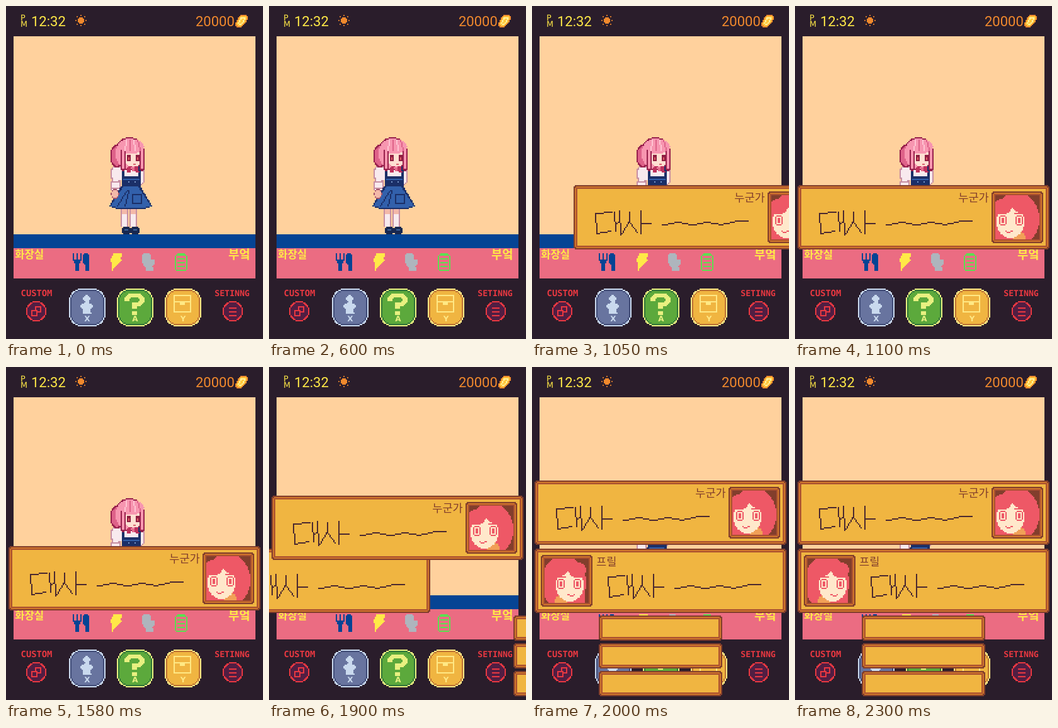
Animation of 408 by 528 pixels, one loop 2.5 s. Source, as an HTML page with a canvas:

```html
<!DOCTYPE html>
<html lang="ko">
<head>
<meta charset="utf-8">
<title>Pocket room</title>
<style>
html, body { margin: 0; width: 100%; height: 100%; overflow: hidden; background: #2a1d2b; }
canvas { display: block; }
</style>
</head>
<body>
<canvas id="stage" width="408" height="528"></canvas>
<script>
const ctx = document.getElementById('stage').getContext('2d');
const LOOP = 2500, STEP = 50, SLIDE_STEPS = 3;
const INK = '#2a1d2b', GOLD = '#f0b541', BROWN = '#823e2c', ORANGE = '#cf752b', RUST = '#ab5130';
const RED = '#e93841', YELLOW = '#ffe947', PINK = '#eb6c82', BLUE = '#054494', PLUM = '#511e43';
const KOREAN = '"Noto Sans CJK KR", "Noto Sans CJK", sans-serif';
const MONO = '"DejaVu Sans Mono", monospace';

// All drawing uses 2px art pixels.
function rect(color, x, y, w, h) {
  ctx.fillStyle = color;
  ctx.fillRect(x, y, w, h);
}

function row(color, cx, y, width) {
  const from = Math.round(cx - width / 2);
  rect(color, from, y, Math.round(cx + width / 2) - from, 1);
}

// Ellipse; lean shifts each row sideways.
function disc(color, cx, cy, rx, ry = rx, lean = 0) {
  for (let y = Math.floor(cy - ry); y < cy + ry; y++) {
    const dy = y + 0.5 - cy, d = 1 - (dy / ry) ** 2;
    if (d > 0) row(color, cx + lean * dy, y, 2 * rx * Math.sqrt(d));
  }
}

// Column whose width goes from top to bottom while its centre drifts.
function taper(color, cx, y, h, top, bottom, drift = 0) {
  for (let i = 0; i < h; i++) {
    const k = i / (h - 1);
    row(color, cx + drift * k, y + i, top + (bottom - top) * k);
  }
}

function round(color, x, y, w, h, r) {
  for (let i = 0; i < h; i++) {
    const k = Math.max(0, r - Math.min(i, h - 1 - i) - 0.5);
    const inset = Math.round(r - Math.sqrt(r * r - k * k));
    rect(color, x + inset, y + i, w - 2 * inset, 1);
  }
}

function line(color, ...p) {
  for (let i = 0; i + 3 < p.length; i += 2) {
    const dx = p[i + 2] - p[i], dy = p[i + 3] - p[i + 1];
    const n = Math.max(Math.abs(dx), Math.abs(dy));
    for (let k = 0; k <= n; k++)
      rect(color, Math.round(p[i] + dx * k / n), Math.round(p[i + 1] + dy * k / n), 1, 1);
  }
}

function text(str, x, y, size, color, family, weight = 400, align = 'left') {
  ctx.font = `${weight} ${size}px ${family}`;
  ctx.textAlign = align;
  ctx.fillStyle = color;
  ctx.fillText(str, x, y);
}

function at(x, y, draw) {
  ctx.save();
  ctx.translate(x, y);
  draw();
  ctx.restore();
}

function drawHeader() {
  ['P', 'M'].forEach((c, i) => text(c, 11.5, 11.5 + 4.8 * i, 6.4, YELLOW, '"DejaVu Sans", sans-serif'));
  text('12:32', 20, 15.8, 11, YELLOW, 'Roboto, sans-serif');
  text('20000', 150.5, 15.8, 11, '#f1892d', 'Roboto, sans-serif');
  disc('#f1892d', 59.5, 11.5, 2.6);
  for (let i = 0; i < 8; i++) {
    const a = i * Math.PI / 4;
    rect(ORANGE, Math.round(59 + 4.4 * Math.cos(a)), Math.round(11 + 4.4 * Math.sin(a)), 1, 1);
  }
  ['#f1892d', '#ffc83a', '#fff0a0', '#ffc83a'].forEach((c, i) =>
    disc(c, 187, 11.8, 4.2 - i, 5.3 - i, -0.45));
}

function drawGirl() {
  const hairDark = '#98204c', hairMid = '#de6289', hair = '#f796b0', shine = '#ffc4d2';
  const skin = '#ffdfd2', white = '#f8eaee', shade = '#c78fa2', navy = '#1b2f68', blue = '#3260ab';
  for (const x of [91, 98]) {
    rect(shade, x, 161, 6, 14);
    rect('#f3b9a9', x + 1, 161, 4, 4);
    rect(white, x + 1, 165, 4, 10);
    round('#182850', x + 1, 175, 7, 6, 2);
    rect('#3e659f', x + 3, 177, 3, 1);
  }

  [[shade, 0], [white, 1]].forEach(([color, inset]) => {
    disc(color, 88, 133, 5.5 - inset, 6.5 - inset);
    disc(color, 107, 135, 3.5 - inset, 7 - inset);
    round(color, 83 + inset, 138, 8 - 2 * inset, 9, 2);
    taper(color, 99, 128, 10, 18 - 2 * inset, 16);
  });
  rect(shade, 84, 139, 6, 1);
  rect(shade, 84, 144, 6, 1);

  rect(navy, 92, 135, 15, 9);
  for (const x of [92, 105]) rect(navy, x, 127, 2, 8);
  rect(blue, 93, 137, 13, 1);
  for (const x of [97, 102]) rect('#7998c9', x, 139, 1, 1);
  taper(navy, 99, 142, 17, 15, 34);
  disc(navy, 99, 158, 16.5, 3.5);
  taper(blue, 99, 143, 16, 12, 32);
  disc(blue, 99, 158, 15, 2.5);
  for (const fold of [-5, -2]) line(navy, 98 + fold / 2, 146, 98 + 2 * fold, 158);
  rect(navy, 100, 149, 8, 8);
  rect(blue, 101, 150, 6, 6);
  disc('#a5546a', 86.5, 149, 3.2, 4.2);
  disc('#f3b9a9', 86.5, 149, 2.4, 3.4);

  disc(hairDark, 88, 119, 5.5, 9);
  disc(hairDark, 98, 117, 12, 13);
  disc(hairMid, 88, 119, 4.3, 7.8);
  disc(hair, 98, 117, 11, 12);
  disc(skin, 101, 121, 7, 6.5);
  disc(hair, 100, 111.5, 9.5, 5.5);
  for (const x of [92, 107]) {
    round(hairDark, x - 1, 113, 4, 18, 2);
    rect(hair, x, 113, 2, 16);
  }
  for (let i = 0; i < 4; i++) {
    line(i % 2 ? hairMid : shine, 95 + 3 * i, 106, 94 + 4 * i, 114);
  }
  for (const x of [96, 103]) {
    rect('#8f1f42', x, 118, 3, 5);
    rect('#e15c64', x + 1, 120, 1, 2);
  }
  rect('#d9636f', 101, 125, 2, 1);
  taper('#bd315d', 98, 127, 5, 3, 3, -1);
  taper('#bd315d', 103, 127, 5, 3, 3, 1);
  rect('#e56b8c', 100, 128, 2, 3);
}

function drawStatus() {
  const grey = '#aeb5bd', green = '#5ae150';
  for (const x of [53, 56, 59]) rect(BLUE, x, 196, 1, 6);
  taper(BLUE, 56.5, 201, 4, 7, 3);
  rect(BLUE, 55, 204, 3, 6);
  round(BLUE, 61, 196, 5, 9, 2);
  rect(BLUE, 63, 197, 3, 13);
  taper(YELLOW, 88.5, 196, 7, 7, 8, -2);
  taper(YELLOW, 88, 201, 9, 8, 1, -4);
  round(grey, 108, 196, 7, 9, 2);
  disc(grey, 113, 204, 4.5, 3.5);
  rect(grey, 115, 201, 3, 4);
  rect(grey, 111, 207, 6, 3);
  round(green, 134, 197, 10, 13, 2);
  rect(green, 136, 196, 6, 2);
  rect(PINK, 135, 198, 8, 11);
  for (let i = 0; i < 3; i++) rect(green, 136, 200 + 3 * i, 6, 1);
  text('화장실', 7, 200.2, 8.4, YELLOW, KOREAN, 700);
  text('부엌', 176.5, 200.6, 9.4, YELLOW, KOREAN, 700);
}

function drawButton(x, letter, fill, light, dark) {
  [light, dark, fill].forEach((c, i) => round(c, x + i, 224 + i, 29 - 2 * i, 30 - 2 * i, 10 - i));
  text(letter, x + 14.5, 250, 6, light, '"DejaVu Sans", sans-serif', 700, 'center');
}

function drawControls() {
  const pale = '#c9d9ee', lime = '#e8f080', cream = '#ffe884', green = '#5ca93c';
  drawButton(50, 'X', '#68749f', pale, '#404b77');
  disc(pale, 64, 232, 2.8);
  disc(pale, 64, 238, 5, 2.2);
  taper(pale, 64, 234, 10, 3, 7);

  drawButton(88, 'A', green, lime, '#2f7538');
  disc(lime, 102, 233, 8, 5.5);
  disc(green, 102, 233, 4, 2.5);
  rect(green, 93, 234, 7, 5);
  rect(lime, 100, 236, 4, 4);
  rect(lime, 100, 242, 4, 3);

  drawButton(126, 'Y', GOLD, cream, '#bd7131');
  round(cream, 133, 229, 14, 14, 1);
  rect(GOLD, 134, 230, 12, 12);
  rect(cream, 134, 234, 12, 1);
  rect(cream, 138, 235, 4, 2);

  text('CUSTOM', 11.8, 230, 6.9, RED, MONO, 700);
  text('SETINNG', 165.6, 230, 6.6, RED, MONO, 700);
  for (const x of [24, 180]) {
    disc(RED, x, 242, 8);
    disc(PLUM, x, 242, 7);
  }
  for (const shift of [0, 3]) {
    rect(RED, 23 - shift, 238 + shift, 5, 5);
    rect(PLUM, 24 - shift, 239 + shift, 3, 3);
  }
  for (let i = 0; i < 3; i++) rect(RED, 177, 239 + 3 * i, 6, 1);
}

function drawFrame(w, h) {
  [BROWN, ORANGE, RUST, GOLD].forEach((c, i) => round(c, i, i, w - 2 * i, h - 2 * i, Math.max(1, 3 - i)));
}

function drawPortrait(mirrored) {
  const hair = '#ee5866', skin = '#ffe8cb';
  drawFrame(41, 41);
  ctx.beginPath();
  ctx.rect(3, 3, 35, 35);
  ctx.clip();
  rect(BROWN, 3, 3, 35, 35);
  if (mirrored) {
    ctx.translate(38, 0);
    ctx.scale(-1, 1);
  }
  disc(hair, 20, 22, 18, 21);
  rect(hair, 3, 22, 26, 16);
  disc('#f1a057', 22, 36, 5, 4);
  disc(skin, 15, 24, 11, 13);
  disc(hair, 9, 12, 7, 6);
  disc(hair, 24, 11, 8, 6);
  taper(hair, 28, 14, 22, 5, 3);
  for (const x of [6, 19]) {
    rect(hair, x - 1, 17, 7, 1);
    round(hair, x, 19, 6, 8, 2);
    rect(skin, x + 1, 20, 4, 6);
    rect(hair, x + 2, 21, 2, 4);
  }
  line(hair, 11, 31, 13, 32, 16, 31);
}

function drawScribble() {
  const ink = '#4b2930';
  line(ink, 30, 21, 17, 22, 18, 38, 29, 36);
  line(ink, 32, 21, 33, 36);
  line(ink, 33, 30, 36, 29);
  line(ink, 36, 20, 37, 39);
  line(ink, 44, 21, 44, 28, 38, 38);
  line(ink, 44, 29, 50, 37);
  line(ink, 53, 20, 53, 38);
  line(ink, 53, 30, 61, 30);
  for (let x = 70; x <= 138; x++) {
    const wave = 0.8 * Math.cos(2 * Math.PI * (x - 94) / 23);
    rect(ink, x, Math.round(30 + wave - 3 * ((x - 70) / 68) ** 8), 1, 1);
  }
}

function drawDialog(x, y, left) {
  at(x, y, () => {
    drawFrame(200, 51);
    at(left ? 5 : 154, 5, () => drawPortrait(left));
    at(left ? 41 : 0, 0, drawScribble);
    if (left) text('프릴', 49, 13.4, 8.8, BROWN, KOREAN, 500);
    else text('누군가', 127.6, 12.8, 8.8, BROWN, KOREAN, 500);
  });
}

// Share of the way still to go: 1 before the slide, 0 once it has arrived.
function remaining(t, begin) {
  const step = Math.floor((t - begin) / STEP) + 1;
  return Math.min(1, Math.max(0, 1 - step / SLIDE_STEPS));
}

function drawScene(t) {
  const enter = remaining(t, 1000), reply = remaining(t, 1900);
  const ease = left => left ** 2.3;
  const glide = (to, travel) => Math.round(to + travel);

  ctx.setTransform(2, 0, 0, 2, 0, 0);
  rect(INK, 0, 0, 204, 264);
  rect('#ffd19d', 6, 24, 192, 157);
  rect(BLUE, 6, 181, 192, 11);
  rect(PINK, 6, 192, 192, 24);
  drawHeader();
  drawGirl();
  drawStatus();
  drawControls();

  if (reply < 1) drawDialog(glide(2, -188 * ease(reply)), 144, true);
  const lift = reply < 1 ? glide(90, 30.5 * ease(reply)) : 142;
  if (enter < 1) drawDialog(glide(2, 389 * ease(enter)), lift, false);
  const choices = glide(53, 201 * reply ** 0.87);
  for (let i = 0; i < 3; i++) at(choices, 197 + 22 * i, () => drawFrame(98, 20));
}

const start = performance.now();
function tick() {
  drawScene((performance.now() - start) % LOOP);
  requestAnimationFrame(tick);
}
tick();
</script>
</body>
</html>
```
